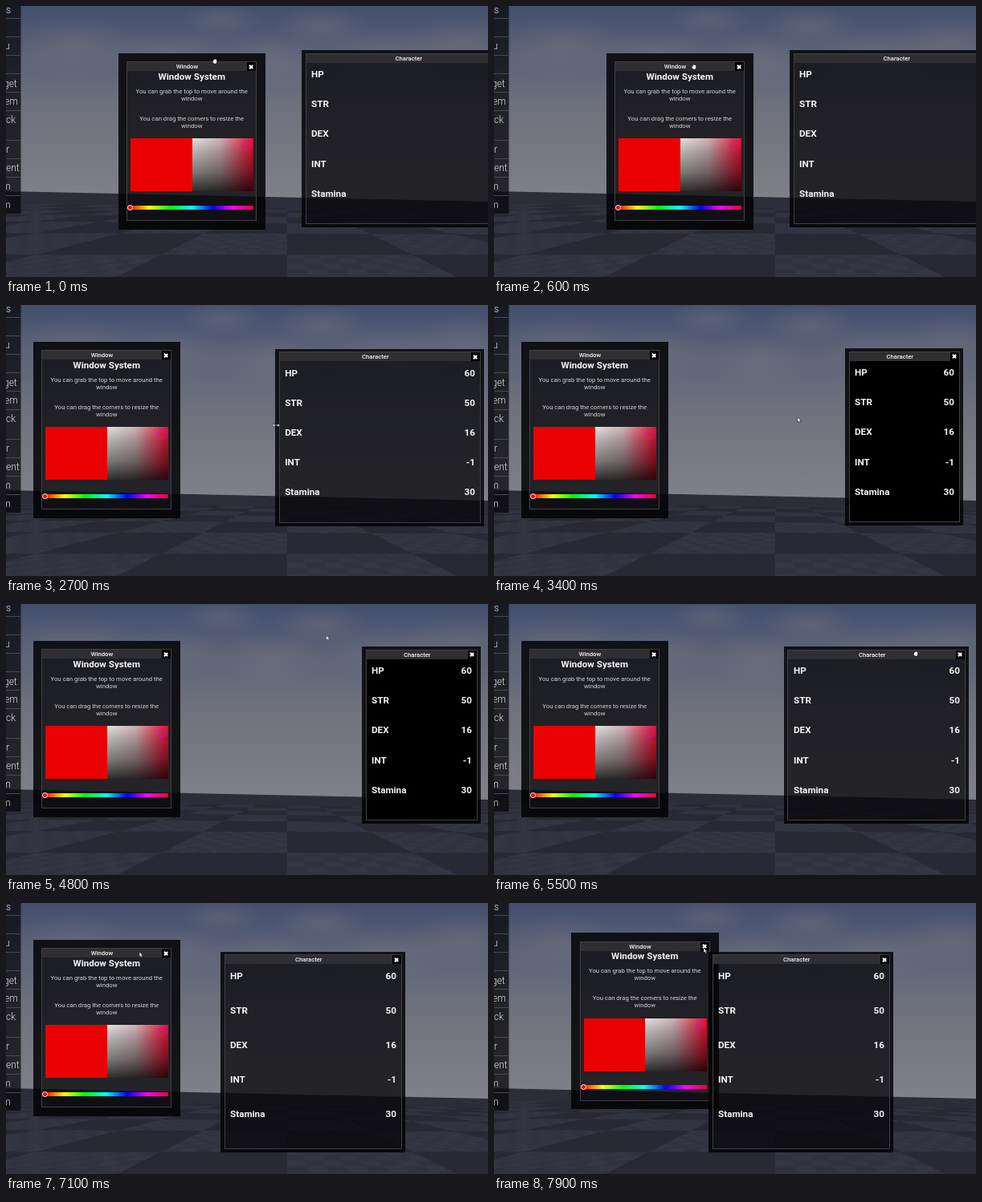
Animation, 600 px wide and 338 px high, one loop 8 s. Source, as an HTML page with a canvas:

```html
<!DOCTYPE html>
<html lang="en">
<head>
<meta charset="utf-8">
<title>Window System</title>
<style>
html, body { margin: 0; width: 100%; height: 100%; overflow: hidden; background: #2a2b38; }
body { font-family: Roboto, "Liberation Sans", sans-serif; color: #f4f4f4; }
#stage { position: absolute; left: 0; top: 0; width: 600px; height: 338px; overflow: hidden; }
#stage * { box-sizing: border-box; }
canvas, svg { position: absolute; left: 0; top: 0; }

.win { position: absolute; overflow: hidden; }
.frame { position: absolute; border: 1px solid #414145; background: rgba(5, 5, 7, .74);
  box-shadow: 0 0 0 12px rgba(2, 2, 4, .84); }
.bar { position: absolute; left: 0; right: 0; top: 0; height: 11px; padding-right: 11px;
  background: #2f2f32; font: 500 7.7px/11px Roboto, "Liberation Sans", sans-serif; text-align: center; }
.close { position: absolute; right: 0; top: 0; width: 11px; height: 11px; background: #000; }
.close::before, .close::after { content: ""; position: absolute; left: 2.3px; top: 4.5px;
  width: 6.4px; height: 2px; background: #fff; transform: rotate(45deg); }
.close::after { transform: rotate(-45deg); }

#tool { left: 139.5px; top: 58.5px; width: 183.5px; height: 220px; animation: tool 8s infinite ease-in-out; }
#tool .frame { left: 10.5px; top: 10.5px; width: 162px; height: 199px; }
#tool p, #tool h1 { position: absolute; left: 0; width: 100%; margin: 0; text-align: center; }
h1 { top: 22px; font: bold 11.6px/14px Roboto, "Liberation Sans", sans-serif; }
p { font-size: 7.75px; line-height: 9.3px; color: #d4d4d4; }
.red, .shade { position: absolute; top: 106.5px; height: 66px; }
.red { left: 15.5px; width: 76.5px; background: #ea0000; }
.shade { left: 92px; width: 76.5px;
  background: linear-gradient(to top, #000c, #0007 35%, #0003 75%, transparent),
    linear-gradient(to right, #e2e2e2, #cfb4b8 45%, #e0304c 88%, #e8102c); }
.pick { position: absolute; left: 155px; top: 109px; width: 11px; height: 11px; border: 1.3px solid #d010c0; border-radius: 50%; }
.hue { position: absolute; left: 13px; top: 190px; width: 155.5px; height: 5px;
  background: linear-gradient(to right, #f00, #ff0 17%, #0f0 33%, #0ff 50%, #00f 67%, #f0f 83%, #f00030); }
.knob { position: absolute; left: 11.5px; top: 189px; width: 7px; height: 7px; border: 1.2px solid #fff; border-radius: 50%; background: #e00; }

#stats { animation: stats 8s infinite ease-in-out; }
#stats .frame { left: 4.5px; right: 4px; top: 3.5px; bottom: 4px; animation: solid 8s infinite step-end; }
.rows { position: absolute; left: 12px; right: 11px; top: 23px; bottom: 12px; display: flex; flex-direction: column; }
.rows div { flex: 1; display: flex; justify-content: space-between; font: bold 11.7px/14px Roboto, "Liberation Sans", sans-serif; }

#cursor { position: absolute; left: 0; top: 0; animation: move 8s infinite ease-in-out; }
#cursor svg { overflow: visible; width: 1px; height: 1px; }
#cursor path { stroke: #111; stroke-width: .5; fill: #fff; opacity: 0; }
#arrow { animation: arrow 8s infinite step-end; }
#hand { animation: hand 8s infinite step-end; }
#wide { animation: wide 8s infinite step-end; }
#tall { animation: tall 8s infinite step-end; }

@keyframes tool {
  0%, 8.75% { left: 139.5px; top: 58.5px; }
  15%, 90.6% { left: 33.5px; top: 45.5px; }
  95%, 100% { left: 96px; top: 37px; }
}
@keyframes stats {
  0%, 23.75% { left: 368px; top: 55px; width: 277px; height: 221px; }
  30%, 32.5% { left: 318px; top: 54.5px; width: 277px; height: 221px; }
  37.5%, 38.1% { left: 448px; top: 54.5px; width: 147px; height: 221px; }
  39.4%, 46.25% { left: 437px; top: 54px; width: 147px; height: 221px; }
  52.5%, 61.9% { left: 443px; top: 53px; width: 148px; height: 221px; }
  67.5%, 68.75% { left: 361px; top: 53px; width: 230px; height: 221px; }
  71.9%, 73.1% { left: 268px; top: 89px; width: 230px; height: 221px; }
  76.9%, 81.25% { left: 268px; top: 60px; width: 230px; height: 250px; }
  83.75%, 100% { left: 267px; top: 60.5px; width: 230px; height: 250px; }
}
@keyframes solid { 37.5% { background: #000; } 67.5%, 100% { background: rgba(5, 5, 7, .74); } }
@keyframes move {
  0% { transform: translate(260px, 69px); }
  7.5%, 8.75% { transform: translate(249px, 76px); }
  15% { transform: translate(143px, 63px); }
  22.5%, 23.75% { transform: translate(451px, 64.5px); }
  30% { transform: translate(401px, 64px); }
  32.5% { transform: translate(319px, 150px); }
  37.5% { transform: translate(449px, 150px); }
  38.1% { transform: translate(460px, 64px); }
  39.4% { transform: translate(449px, 63px); }
  42.5% { transform: translate(378px, 140px); }
  46.25% { transform: translate(490px, 63px); }
  52.5% { transform: translate(496px, 62px); }
  60% { transform: translate(398.5px, 39px); }
  61.9% { transform: translate(444px, 150px); }
  67.5% { transform: translate(362px, 150px); }
  68.75% { transform: translate(525px, 62px); }
  71.9% { transform: translate(432px, 98px); }
  73.1% { transform: translate(440px, 92px); }
  76.9%, 78% { transform: translate(440px, 63px); }
  81.25% { transform: translate(430px, 69px); }
  83.75% { transform: translate(429px, 69.5px); }
  89%, 90.6% { transform: translate(165px, 61px); }
  95% { transform: translate(227.5px, 52.5px); }
  98.75%, 100% { transform: translate(261px, 56px); }
}
@keyframes arrow {
  0% { opacity: 0; } 15% { opacity: 1; } 22% { opacity: 0; } 30% { opacity: 1; } 32.5% { opacity: 0; }
  39.4% { opacity: 1; } 46.25% { opacity: 0; } 52.5% { opacity: 1; } 61.9% { opacity: 0; }
  78.75% { opacity: 1; } 81% { opacity: 0; } 83.75% { opacity: 1; } 89% { opacity: 0; } 95.5%, 100% { opacity: 1; }
}
@keyframes hand {
  0% { opacity: 1; } 15% { opacity: 0; } 22% { opacity: 1; } 30% { opacity: 0; } 38.1% { opacity: 1; }
  39.4% { opacity: 0; } 46.25% { opacity: 1; } 52.5% { opacity: 0; } 68.75% { opacity: 1; } 71.9% { opacity: 0; }
  81% { opacity: 1; } 83.75% { opacity: 0; } 89% { opacity: 1; } 95.5%, 100% { opacity: 0; }
}
@keyframes wide { 0% { opacity: 0; } 32.5% { opacity: 1; } 38.1% { opacity: 0; } 61.9% { opacity: 1; } 68.75%, 100% { opacity: 0; } }
@keyframes tall { 0% { opacity: 0; } 71.9% { opacity: 1; } 78.75%, 100% { opacity: 0; } }
</style>
</head>
<body>
<div id="stage">
  <canvas id="scene" width="600" height="338"></canvas>
  <svg id="menu" width="19" height="260"></svg>

  <div id="tool" class="win">
    <div class="frame"><div class="bar">Window<i class="close"></i></div></div>
    <h1>Window System</h1>
    <p style="top:43px">You can grab the top to move around the<br>window</p>
    <p style="top:77px">You can drag the corners to resize the<br>window</p>
    <div class="red"></div><div class="shade"></div><div class="pick"></div>
    <div class="hue"></div><div class="knob"></div>
  </div>

  <div id="stats" class="win">
    <div class="frame"><div class="bar">Character<i class="close"></i></div></div>
    <div class="rows">
      <div><span>HP</span><span>60</span></div>
      <div><span>STR</span><span>50</span></div>
      <div><span>DEX</span><span>16</span></div>
      <div><span>INT</span><span>-1</span></div>
      <div><span>Stamina</span><span>30</span></div>
    </div>
  </div>

  <div id="cursor"><svg>
    <path id="arrow" d="M0 0V6L1.4 4.8L2.4 7L3.5 6.5L2.5 4.4H4.3Z"/>
    <path id="hand" d="M-2.6-.8L-1.6-1V-2.6H-.5L0-3L1-2.6L2.4-2V1.2L1.6 3H-1.2L-2.6 1Z"/>
    <path id="wide" d="M-4.5 0L-2-2.2V-.6H2V-2.2L4.5 0L2 2.2V.6H-2V2.2Z"/>
    <path id="tall" d="M0-4.5L2.2-2H.6V2H2.2L0 4.5L-2.2 2H-.6V-2H-2.2Z"/>
  </svg></div>
</div>
<script>
const ctx = document.getElementById('scene').getContext('2d');

function drawSky() {
  const sky = ctx.createLinearGradient(0, 0, 0, 245);
  sky.addColorStop(0, '#434f6e');
  sky.addColorStop(.25, '#5b6277');
  sky.addColorStop(.5, '#6e707c');
  sky.addColorStop(1, '#808189');
  ctx.fillStyle = sky;
  ctx.fillRect(0, 0, 600, 338);

  // soft clouds: x, y, radius
  const clouds = [[85, 52, 65], [205, 62, 55], [268, 16, 36], [330, 68, 55],
    [392, 24, 42], [475, 62, 62], [570, 46, 55]];
  for (const [x, y, r] of clouds) {
    ctx.save();
    ctx.translate(x, y);
    ctx.scale(1.4, .6);
    const puff = ctx.createRadialGradient(0, 0, 0, 0, 0, r);
    puff.addColorStop(0, 'rgba(132,126,130,.3)');
    puff.addColorStop(1, 'rgba(132,126,130,0)');
    ctx.fillStyle = puff;
    ctx.fillRect(-r, -r, 2 * r, 2 * r);
    ctx.restore();
  }
}

// ground plane: columns meet at x = 350, rows are evenly spaced in depth
const skew = x => (x - 350) * .022;
function point(col, depth) {
  const drop = 1 / (.0064 * (1 + depth));
  const x = 350 + col * 2 * drop;
  return [x, 232 + drop + skew(x) * Math.max(0, 1 - drop / 60)];
}

function tile(col, depth, size, color) {
  ctx.fillStyle = color;
  ctx.beginPath();
  ctx.moveTo(...point(col, depth));
  ctx.lineTo(...point(col + size, depth));
  ctx.lineTo(...point(col + size, depth + size));
  ctx.lineTo(...point(col, depth + size));
  ctx.fill();
}

function drawGround() {
  ctx.fillStyle = '#2d2d39';
  ctx.beginPath();
  ctx.moveTo(0, 231);
  ctx.lineTo(600, 244);
  ctx.lineTo(600, 338);
  ctx.lineTo(0, 338);
  ctx.fill();
  for (let d = 0; d < 7; d++) {
    for (let c = -8; c < 8; c++) {
      const light = (c + d) % 2 === 0;
      tile(c, d, 1, light ? '#31323f' : '#292935');
      if (!light || d > 4) continue;
      for (let k = 0; k < 64; k++) {
        const i = k % 8, j = k >> 3;
        if ((i + j) & 1) tile(c + i / 8, d + j / 8, 1 / 8, '#353643');
      }
    }
  }
}

function drawMenu() {
  const labels = [['s', 0, 9], ['u', -2, 54], ['get', -3, 101], ['em', -2, 123], ['ck', 0, 146],
    ['r', 0, 183], ['ent', 0, 206], ['m', -5, 229], ['m', -5, 252]];
  const lines = [15, 38, 61, 84, 107, 130, 167, 190, 213, 236];
  document.getElementById('menu').innerHTML =
    '<rect width="18.5" height="259" fill="#08080b" opacity=".74"/>' +
    lines.map(y => `<path d="M0 ${y}.5H18" stroke="#4a4a50"/>`).join('') +
    labels.map(([s, x, y]) => `<text x="${x}" y="${y}" font-size="12" font-weight="300" fill="#dedee0">${s}</text>`).join('');
}

drawSky();
drawGround();
drawMenu();
</script>
</body>
</html>
```
